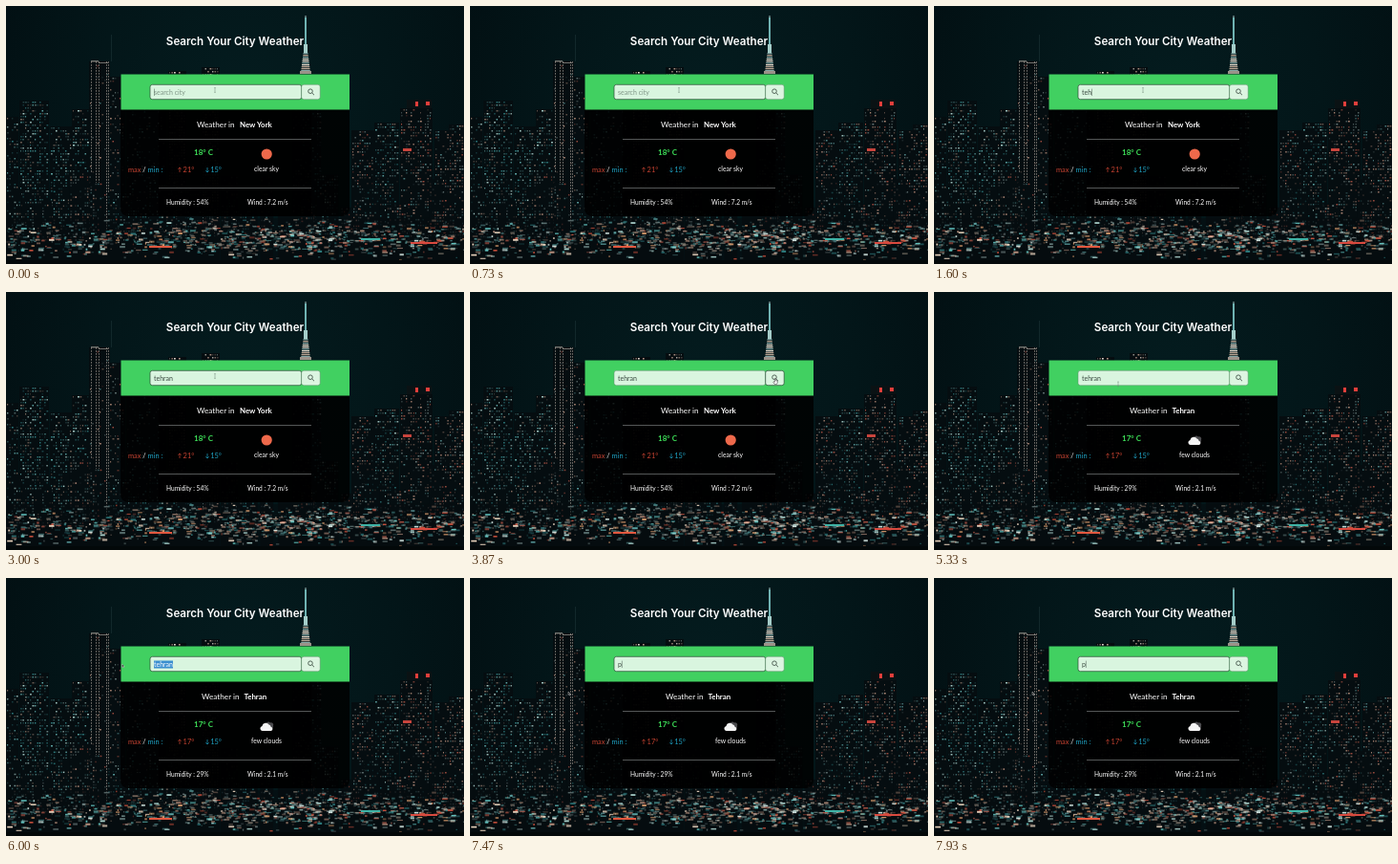
An HTML page with a canvas for the animation above (8000 ms loop, 480 by 270 pixels).

```html
<!DOCTYPE html>
<html lang="en">
<head>
<meta charset="utf-8">
<title>City weather</title>
<style>
  html, body { margin: 0; width: 100%; height: 100%; overflow: hidden; background: #020f12; }
  canvas, svg { position: absolute; left: 0; top: 0; width: 480px; height: 270px; }
  text { font-family: Lato, sans-serif; font-size: 6.8px; fill: #fff; white-space: pre; }
  .title { font: 600 11.6px Inter, sans-serif; text-anchor: middle; }
  .place { font-size: 8.2px; }
  .bold { font-size: 7.9px; font-weight: 700; }
  .mid { text-anchor: middle; }
  .small { font-size: 6.6px; }
  .range { font-size: 7.4px; }
  .green { fill: #3ee25a; font-size: 8px; font-weight: 700; }
  .red { fill: #c94332; }
  .cyan { fill: #1fa3c4; }
  .field { font-size: 7px; fill: #3a4a40; }
  .hint { fill: #7f9686; }
  .rule { stroke: #8d9292; stroke-width: .6; }
  .arrow { fill: none; stroke-width: .7; }
</style>
</head>
<body>
<canvas id="city" width="480" height="270"></canvas>
<svg viewBox="0 0 480 270">
  <defs><clipPath id="selClip"><rect id="selArea" y="86.5" height="8"/></clipPath></defs>

  <text class="title" x="240" y="40.6">Search Your City Weather</text>

  <path d="M120 108H360V212a8 8 0 0 1-8 8H128a8 8 0 0 1-8-8Z" fill="#000" fill-opacity=".84"/>
  <rect x="160" y="108" width="160" height="112" fill="#000" fill-opacity=".8"/>
  <rect x="120.5" y="71.5" width="239.5" height="37" fill="#41d061"/>

  <rect id="input" x="151" y="82.3" width="158.7" height="15.4" rx="2.4" fill="#d9f5df"/>
  <rect id="button" x="309.7" y="82.3" width="19.5" height="15.4" rx="2.4" fill="#dcf5e1"/>
  <g fill="none" stroke="#34453a" stroke-width=".8">
    <circle cx="319" cy="89.2" r="2.3"/><path d="M320.8 91L323 93.2"/>
  </g>
  <text id="query" class="field" x="155" y="92.6"></text>
  <g clip-path="url(#selClip)">
    <rect x="150" y="86" width="40" height="9" fill="#3b8fd0"/>
    <text class="field" x="155" y="92.6" style="fill:#fff">tehran</text>
  </g>
  <rect id="caret" y="86.6" width=".5" height="7.4" fill="#4a5a50"/>

  <text id="label" class="place" y="127.2">Weather in</text>
  <text id="place" class="bold" y="127.2"></text>
  <path class="rule" d="M160 139.5H320M160 190.5H320"/>
  <text id="temp" class="green mid" x="207" y="156"></text>

  <text class="range" x="128" y="173.6"><tspan class="red">max</tspan> / <tspan class="cyan">min :</tspan></text>
  <path class="arrow" stroke="#c94332" d="M182 174V169M180.4 170.7L182 169L183.6 170.7"/>
  <text id="high" class="range red" x="185.6" y="174"></text>
  <path class="arrow" stroke="#1fa3c4" d="M211 169V174M209.4 172.3L211 174L212.6 172.3"/>
  <text class="range cyan" x="214.2" y="174">15°</text>

  <circle id="sun" cx="273.2" cy="155" r="5.6" fill="#ee694b"/>
  <g id="cloud">
    <path d="M272 155a3.2 3.2 0 0 1 5-3.6a2.4 2.4 0 0 1 3 3.3a2 2 0 0 1-1 2.6H273Z" fill="#4b4b4e"/>
    <path d="M268.6 160a2.6 2.6 0 0 1-.2-5.1a4 4 0 0 1 7.2-1.4a2.6 2.6 0 0 1 2 2.2a2.2 2.2 0 0 1 .2 4.3Z" fill="#f4f4f4"/>
  </g>
  <text id="sky" class="mid" x="273" y="173"></text>
  <text id="humid" class="small" x="168" y="208"></text>
  <text id="wind" class="small" x="253" y="208"></text>

  <g id="pointer">
    <path id="beam" d="M-.8 -2.4H.8M0 -2.4V2.4M-.8 2.4H.8" fill="none" stroke="#6f8576" stroke-width=".5"/>
    <path id="tip" d="M0 0V3.4L.9 2.7L1.5 3.9L2 3.6L1.5 2.5H2.5Z" fill="#111" stroke="#ddd" stroke-width=".45"/>
    <path id="hand" d="M-.6 -2.2a.6 .6 0 0 1 1.2 0V-.4L2.2 .2V2L1.6 3.4H-.9L-2.2 1.2L-1.6 .6L-.6 1.3Z" fill="#fff" stroke="#222" stroke-width=".5"/>
  </g>
</svg>

<script>
const LOOP = 8000;
const $ = id => document.getElementById(id);

// Night skyline
function drawCity() {
  const c = $('city').getContext('2d');
  let seed = 41;
  const rnd = () => {
    seed = (Math.imul(seed, 1664525) + 1013904223) >>> 0;
    return seed / 4294967296;
  };
  const box = (color, x, y, w, h) => { c.fillStyle = color; c.fillRect(x, y, w, h); };
  const pick = list => list[Math.floor(rnd() * list.length)];
  const cool = ['#2f7f82', '#5fa8a8', '#a9cfca', '#1f5054', '#3c6668', '#7c6a5e'];
  const warm = ['#8c6d5f', '#b08a78', '#6d7f7f', '#4d5a5b', '#9c4c3f', '#4f8284'];

  const sky = c.createRadialGradient(250, 90, 20, 250, 90, 290);
  sky.addColorStop(0, '#041b1e');
  sky.addColorStop(.5, '#031619');
  sky.addColorStop(1, '#020f12');
  c.fillStyle = sky;
  c.fillRect(0, 0, 480, 270);

  function tower(x, y, w, lights, density) {
    box('#050d10', x, y, w, 270 - y);
    for (let v = y + 1; v < 245; v += 3)
      for (let u = x + 1; u < x + w - 1; u += 2.5)
        if (rnd() < density) {
          c.globalAlpha = .2 + rnd() * .8;
          box(pick(lights), u, v, 1 + rnd(), 1.5);
        }
    c.globalAlpha = 1;
  }

  tower(0, 116, 13, cool, .35);
  tower(14, 99, 31, cool, .5);
  tower(46, 126, 23, cool, .4);
  tower(69, 108, 18, cool, .45);
  tower(87, 58, 22, warm, .08);
  tower(108, 74, 17, warm, .2);
  for (const x of [89, 94, 97, 105, 107]) {
    c.globalAlpha = .65;
    for (let y = 58; y < 235; y += 3) box('#a39c94', x, y, 1, 1.8);
  }
  c.globalAlpha = .7;
  box('#a39c94', 89, 57, 8, 1.5);
  box('#a39c94', 97, 59, 10, 1);
  box('#20383b', 110, 30, .8, 28);
  c.globalAlpha = 1;
  tower(126, 100, 42, cool, .25);
  for (const [x, y] of [[170, 68], [205, 64]]) tower(x, y, 19, ['#c9a795', '#e6ddd2', '#6f8585'], .75);
  tower(300, 78, 30, cool, .4);
  tower(362, 130, 24, warm, .35);
  tower(386, 122, 26, cool, .48);
  tower(413, 107, 34, warm, .42);
  tower(449, 130, 16, warm, .4);
  tower(464, 124, 16, warm, .5);
  box('#0a1214', 420, 98, 26, 9);
  box('#e53f3b', 429, 100, 3, 5);
  box('#e53f3b', 440, 100, 4, 4);
  box('#c9443c', 416, 149, 9, 3);

  // Lit spire
  box('#2f8a8c', 313, 12, 2, 28);
  box('#cfeeea', 313.6, 10, .8, 30);
  box('#a5cdc9', 312, 40, 4, 9);
  for (let y = 49; y < 68; y += 2) {
    const half = 2.5 + (y - 49) / 8;
    box(pick(['#e9dfd0', '#b9a594', '#87a8a6']), 314 - half, y, half * 2, 1.3);
  }
  box('#9b9188', 308, 68, 12, 3);

  // Low blocks and street glow
  for (let x = 0; x < 480; x += 16 + rnd() * 14)
    tower(x, 172 + rnd() * 50, 13 + rnd() * 16, pick([cool, warm]), .4);
  box('rgba(5,13,16,.6)', 0, 222, 480, 48);
  const street = [...cool, ...warm, '#e8d3bd', '#d9ebe6', '#62c4c0', '#d8553f', '#e0a070'];
  for (let i = 0; i < 900; i++) {
    const y = 222 + (rnd() + rnd()) * 22;
    c.globalAlpha = .3 + rnd() * .7;
    box(pick(street), rnd() * 480, y, 1 + rnd() * 5, 1 + rnd() * 1.2);
  }
  for (let i = 0; i < 150; i++)
    box(pick(['#e8d3bd', '#d9ebe6', '#a9cfca', '#b08a78']), 185 + rnd() * 175, 222 + rnd() * 34, 1 + rnd() * 4, 1.5);
  c.globalAlpha = 1;
  box('#030809', 0, 266, 480, 4);
  box('#e2583f', 150, 251, 24, 2);
  box('#3fb2a5', 372, 243, 20, 2);
  box('#d94a3f', 424, 247, 28, 2);
}

const reports = [
  { city: 'New York', label: 200, place: 245, temp: '18° C', high: '21°', sky: 'clear sky', humid: '54%', wind: '7.2' },
  { city: 'Tehran', label: 205, place: 249.4, temp: '17° C', high: '17°', sky: 'few clouds', humid: '29%', wind: '2.1' }
];

// [time, text] after each key press
const typed = [[0, ''], [1270, 't'], [1400, 'te'], [1600, 'teh'], [1870, 'tehr'],
  [2130, 'tehra'], [2470, 'tehran'], [5530, 'tehran'], [7470, 'p']];

// [time, x, y] of the pointer
const path = [[0, 219, 88], [3000, 219, 88], [3600, 320, 93], [4130, 320, 93], [4670, 317, 152],
  [4800, 317, 152], [5450, 181, 91], [5560, 181, 91], [5930, 121.5, 90], [6050, 121.5, 90],
  [6400, 92, 118], [6530, 103, 119], [LOOP, 103, 119]];

const lastBefore = (list, t) => list.findLast(k => k[0] <= t);

function pointerAt(t) {
  const i = path.findIndex(k => k[0] > t);
  const [t0, x0, y0] = path[i - 1], [t1, x1, y1] = path[i];
  const p = (t - t0) / (t1 - t0), e = p * p * (3 - 2 * p);
  return [x0 + (x1 - x0) * e, y0 + (y1 - y0) * e];
}

function outline(el, focused) {
  el.setAttribute('stroke', focused ? '#2c4a36' : '#5f8a6b');
  el.setAttribute('stroke-width', focused ? .7 : .5);
}

const show = (id, on) => { $(id).style.display = on ? '' : 'none'; };
const write = (id, text) => { if ($(id).textContent !== text) $(id).textContent = text; };

function render(t) {
  const [keyTime, text] = lastBefore(typed, t);
  const [x, y] = pointerAt(t);
  const inField = x > 151 && x < 309.5 && y > 82 && y < 98;
  const onButton = x >= 309.5 && x < 329 && y > 82 && y < 98;

  $('pointer').setAttribute('transform', `translate(${x} ${y})`);
  show('beam', inField);
  show('hand', onButton);
  show('tip', !inField && !onButton);

  const focused = t < 3800 || t >= 5530;
  outline($('input'), focused);
  outline($('button'), t >= 3800 && t < 4700);

  write('query', text || 'search city');
  $('query').classList.toggle('hint', !text);
  const end = 155 + (text ? $('query').getComputedTextLength() : 0);

  const selecting = t >= 5560 && t < 7470;
  const from = Math.max(155, Math.min(end, t < 5930 ? x : 155));
  $('selArea').setAttribute('x', from);
  $('selArea').setAttribute('width', selecting ? end - from : 0);

  show('caret', focused && !selecting && (t - keyTime) % 1060 < 530);
  $('caret').setAttribute('x', end);

  const r = reports[t < 4400 ? 0 : 1];
  $('label').setAttribute('x', r.label);
  $('place').setAttribute('x', r.place);
  write('place', r.city);
  write('temp', r.temp);
  write('high', r.high);
  write('sky', r.sky);
  write('humid', `Humidity : ${r.humid}`);
  write('wind', `Wind : ${r.wind} m/s`);
  show('sun', t < 4930);
  show('cloud', t >= 4930);
}

drawCity();
const start = performance.now();
function tick() {
  render((performance.now() - start) % LOOP);
  requestAnimationFrame(tick);
}
tick();
</script>
</body>
</html>
```
